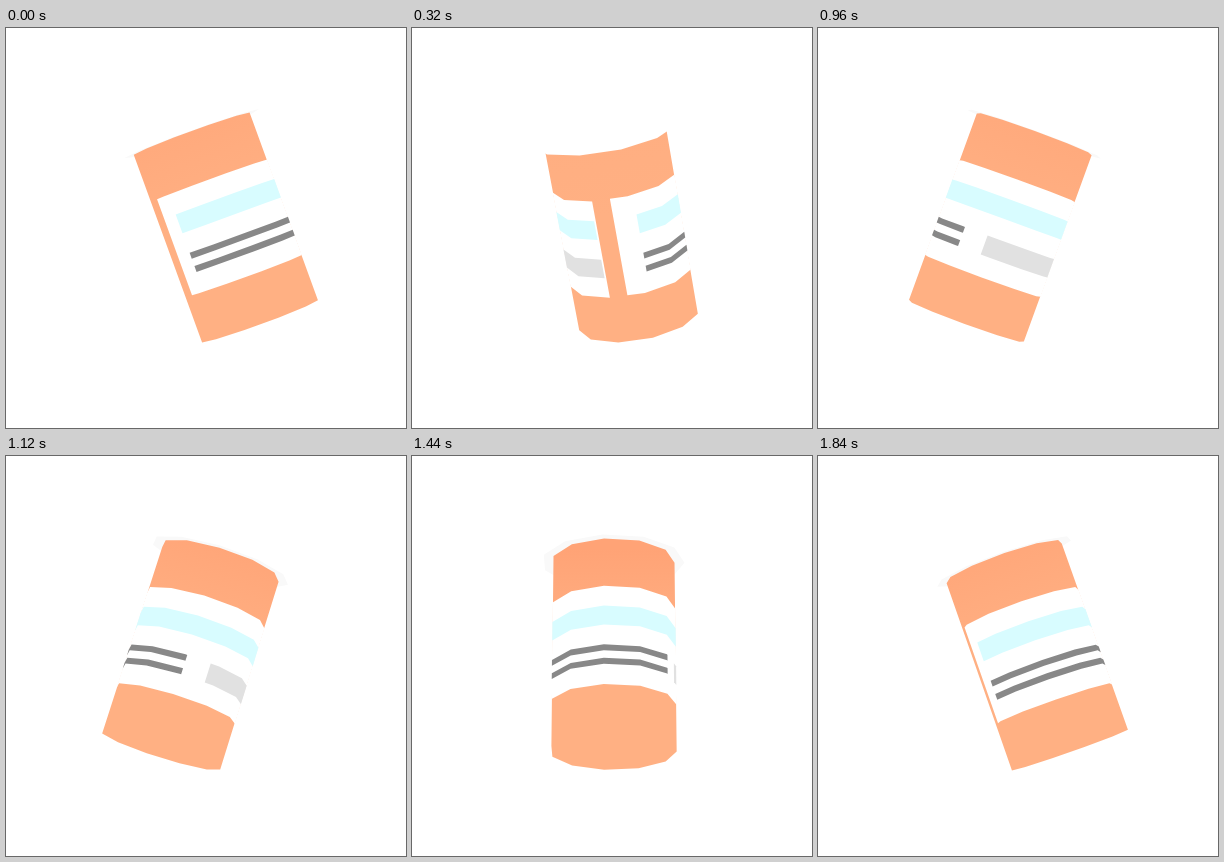
Recreate the animation shown at these times as an HTML page with a canvas. Size 400 by 400 pixels, loop 1.92 s.

```html
<!DOCTYPE html>
<html lang="en">
<head>
<meta charset="utf-8">
<title>Spinning bottle</title>
<style>
html, body { margin: 0; width: 100%; height: 100%; overflow: hidden; background: #fff; }
canvas { display: block; width: 400px; height: 400px; }
</style>
</head>
<body>
<canvas id="stage" width="400" height="400"></canvas>
<script>
const ctx = document.getElementById('stage').getContext('2d');
const STEPS = 24, STEP_MS = 80;
const SIDES = 11, BODY = 62, LABEL = 62.4, CAP = 72, LENGTH = 199;
const TILT = 20 * Math.PI / 180, PHASE = -49 * Math.PI / 180;
const PIVOT = 44.7, CAMERA = 2000;
let turn = 0;

// Local point -> tilted, spun about the vertical, then seen in perspective.
function project(x, down, z) {
  const y = PIVOT - down;
  const tx = x * Math.cos(TILT) - y * Math.sin(TILT);
  const ty = x * Math.sin(TILT) + y * Math.cos(TILT);
  const px = tx * Math.cos(turn) + z * Math.sin(turn);
  const pz = z * Math.cos(turn) - tx * Math.sin(turn);
  const k = CAMERA / (CAMERA - pz);
  return [201 + px * k, 200 - (ty + 52) * k];
}

// Point on the many-sided wall; `side` counts corners and may be fractional.
function wall(side, down, radius) {
  const i = Math.floor(side), f = side - i;
  const a = PHASE + i * 2 * Math.PI / SIDES, b = a + 2 * Math.PI / SIDES;
  return project(
    radius * (Math.sin(a) * (1 - f) + Math.sin(b) * f), down,
    radius * (Math.cos(a) * (1 - f) + Math.cos(b) * f));
}

function facesViewer(points) {
  return points.reduce((sum, [x, y], i) => {
    const [nx, ny] = points[(i + 1) % points.length];
    return sum + x * ny - nx * y;
  }, 0) > 0;
}

function fill(polygons, color) {
  ctx.beginPath();
  for (const [start, ...rest] of polygons) {
    ctx.moveTo(...start);
    rest.forEach(p => ctx.lineTo(...p));
    ctx.closePath();
  }
  ctx.fillStyle = color;
  ctx.fill();
}

function disc(down, radius) {
  return Array.from({ length: SIDES }, (_, i) => wall(i, down, radius));
}

function strip(top, bottom, from, to, radius) {
  const quads = [];
  for (let a = from; a < to;) {
    const b = Math.min(Math.floor(a) + 1, to);
    quads.push([wall(a, top, radius), wall(b, top, radius),
                wall(b, bottom, radius), wall(a, bottom, radius)]);
    a = b;
  }
  return quads.filter(facesViewer);
}

const band = (top, bottom, from, to, color) =>
  fill(strip(top, bottom, from, to, LABEL), color);

// The orange is a little deeper under the cap when the bottle leans away.
function bodyColor() {
  const shade = 0.55 - 0.45 * Math.sin(turn);
  const g = ctx.createLinearGradient(...project(0, -15, 0), ...project(0, 85, 0));
  g.addColorStop(0, `rgb(255,${176 - 13 * shade},${131 - 13 * shade})`);
  g.addColorStop(1, 'rgb(255,176,131)');
  return g;
}

function draw() {
  ctx.clearRect(0, 0, 400, 400);
  const cap = disc(0, CAP), base = disc(LENGTH, BODY);
  const capBehind = facesViewer(cap);
  if (capBehind) fill([cap], '#f9f9f9');

  const body = strip(0, LENGTH, 0, SIDES, BODY);
  if (facesViewer(base)) body.push(base);
  fill(body, bodyColor());

  band(50, 151, -0.5, 10, '#fff');
  band(70.7, 90.2, 0.17, 9.94, '#d8fcff');
  band(110.6, 116.6, 0.17, 6.05, '#888');
  band(124.3, 130.4, 0.17, 6.05, '#888');
  band(110.8, 130.4, 6.75, 9.94, '#e1e1e1');

  if (!capBehind) fill([cap], '#fff');
}

function tick(now) {
  turn = Math.floor(now / STEP_MS) % STEPS / STEPS * 2 * Math.PI;
  draw();
  requestAnimationFrame(tick);
}
tick(performance.now());
</script>
</body>
</html>
```
